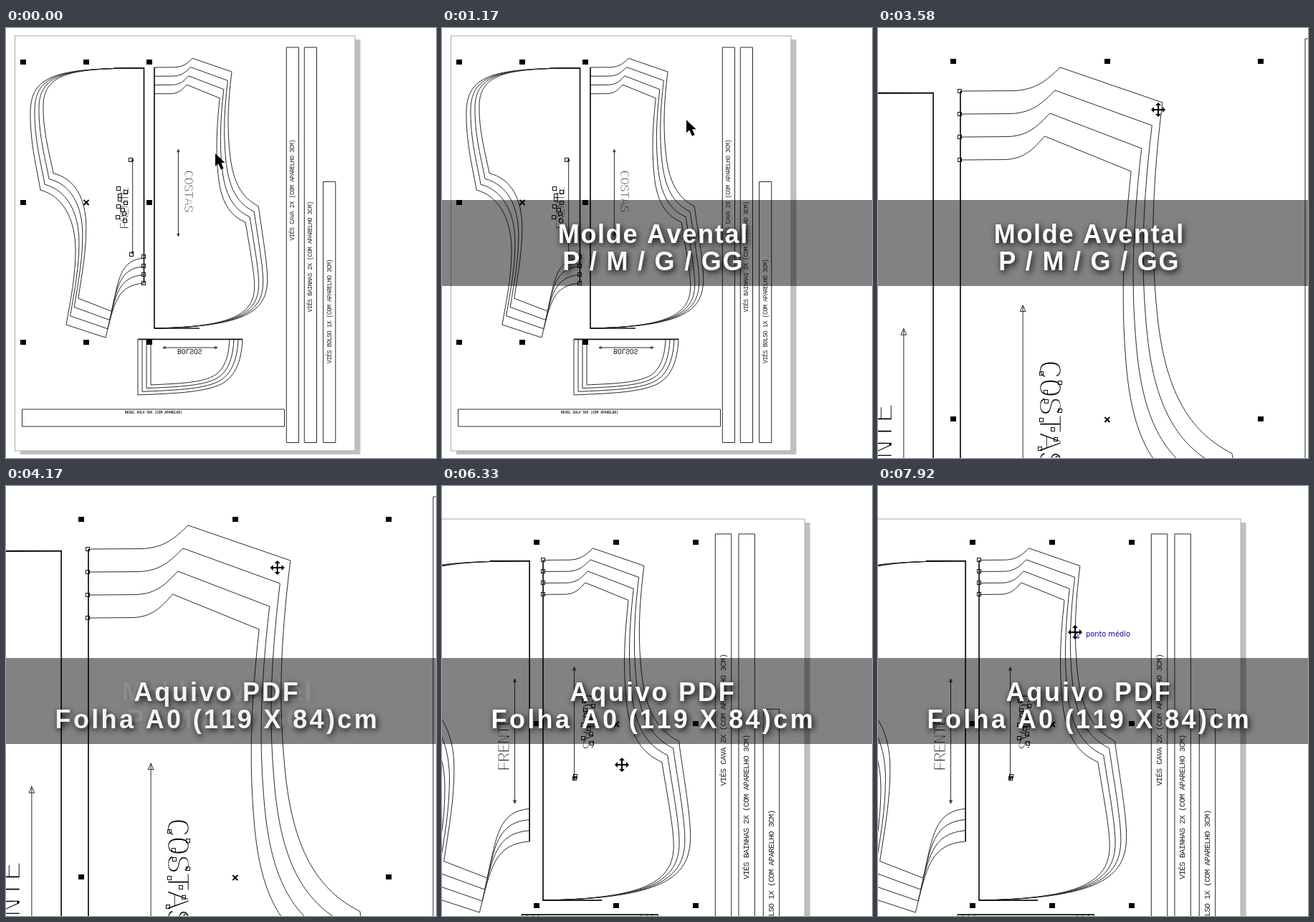
Animation of 600 by 600 pixels, one loop 8000 ms. Source, as an HTML page:

```html
<!DOCTYPE html>
<html lang="pt">
<head>
<meta charset="utf-8">
<title>Molde Avental</title>
<style>
  html, body { margin: 0; width: 100%; height: 100%; overflow: hidden; background: #fff; }
  svg { display: block; width: 100vw; height: 100vh; }
  #world path, #world rect { fill: none; stroke: #2a2a2a; stroke-width: 1; vector-effect: non-scaling-stroke; }
  #world .bold { stroke: #111; stroke-width: 1.7; }
  #world text { font-family: "Liberation Mono", monospace; fill: #222; }
  #world .big { font-size: 18px; letter-spacing: -1.1px; fill: #000; stroke: #fff; stroke-width: 1px; }
  .small { font-size: 8.4px; letter-spacing: -.49px; }
  .pocket { font-size: 10px; letter-spacing: -.3px; }
  .tiny { font-size: 4.6px; font-weight: bold; }
  .title { font: bold 36px "Liberation Sans", Arial, sans-serif; font-kerning: none; fill: #fff;
    text-anchor: middle; filter: drop-shadow(2px 3px 4px #000); }
  .hint { font: 9.8px "DejaVu Sans", Verdana, sans-serif; fill: #00009c; }
  .mark { fill: none; stroke: #1a1ab0; }
</style>
</head>
<body>
<svg viewBox="0 0 600 600" preserveAspectRatio="none">
  <rect width="600" height="600" fill="#fff"/>
  <rect id="shade" fill="#bfbfbf"/>
  <rect id="page" fill="#fff" stroke="#a8a8a8"/>
  <g id="world"></g>
  <g id="nodes" fill="none" stroke="#111"></g>
  <path id="grips"/>
  <path id="cross" fill="none" stroke="#000" stroke-width="2"/>
  <g id="nodeHint">
    <path class="mark" d="M235.5 37.5h10v9h-10zM256.5 37.5h8v9h-8z"/>
    <text class="hint" x="274" y="45">nó</text>
  </g>
  <g id="midHint">
    <path class="mark" d="M273 212l4-7 4 7z"/>
    <text class="hint" x="290" y="210">ponto médio</text>
  </g>
  <path id="cursor"/>
  <g id="banner">
    <rect y="240" width="600" height="120" fill="#000" fill-opacity=".49"/>
    <g id="title1" class="title">
      <text x="294.8" y="300" letter-spacing="1.7">Molde Avental</text>
      <text x="294.8" y="338" letter-spacing="1.8">P / M / G / GG</text>
    </g>
    <g id="title2" class="title">
      <text x="294.5" y="300" letter-spacing="2.8">Aquivo PDF</text>
      <text x="294.8" y="338" letter-spacing="3.35">Folha A0 (119 X 84)cm</text>
    </g>
  </g>
</svg>
<script>
const $ = id => document.getElementById(id);
const LOOP = 8000, STEP = LOOP / 96, SIZES = [0, 1, 2, 3];
const ramp = (t, a, b) => Math.min(1, Math.max(0, (t - a) / (b - a)));

// Grading: the armhole end shrinks towards the hem, the sides towards the fold.
const inset = d => Math.min(18, 0.155 * Math.abs(d));
const drop = (y, from, to) => 36.8 * (1 - ramp(y, from, to) ** 1.465);
const pieces = [
  {
    d: 'M192.5 356C154 359 151 385 139 432L84 414C91 375 97 345 97 310C97 265 78 234 48 226C44 200 33 160 34 115C36 64 75 56 192.5 56',
    grade: (x, y, k) => [x + k * inset(192.5 - x), y - k * drop(y, 400, 56)]
  },
  {
    d: 'M207 55L235.7 54.8C248 54.2 253.4 48.9 260.3 42.3L315 61.1C309 110 309 140 312 172C316 215 329 237 352.2 248.7C358 290 365 330 364.7 352C364 395 335 417 207 419',
    grade: (x, y, k) => [x - k * inset(x - 207), y + k * drop(y, 61, 419)]
  },
  {
    d: 'M184 434L184 512C230 510 275 509 300 497C322 486 329 460 330 434',
    grade: (x, y, k) => [257 + (x - 257) * (1 - 0.247 * k), 434 + (y - 434) * (1 - 0.18 * k)]
  }
];
const graded = ({ d, grade }) => SIZES.map(i =>
  path(d.replace(/([\d.]+) ([\d.]+)/g, (_, x, y) => grade(+x, +y, i / 3).join(' '))));

const path = (d, cls = '') => `<path class="${cls}" d="${d}"/>`;
const box = (x, y, w, h) => `<rect x="${x}" y="${y}" width="${w}" height="${h}"/>`;
const label = (s, x, y, turn, cls) =>
  `<text class="${cls}" transform="translate(${x} ${y}) ${turn}">${s}</text>`;
const arrowV = (x, a, b) =>
  path(`M${x} ${a}V${b}M${x - 1.5} ${a + 3.3}h3l-1.5-3.3zM${x - 1.5} ${b - 3.3}h3l-1.5 3.3z`);
const strip = (x, top, s, y) =>
  box(x, top, 17.2, 578.5 - top) + label(`VIÉS ${s} (COM APARELHO 3CM)`, x + 11, y, 'rotate(-90)', 'small');

$('world').innerHTML = [
  label('FRENTE', 170.7, 281, 'rotate(-90)', 'big'),
  label('COSTAS', 249, 198.5, 'rotate(90)', 'big'),
  label('BOLSOS', 239, 447.5, 'scale(1 -1)', 'pocket'),
  label('REVEL GOLA 50X (COM APARELHO)', 166, 538, '', 'tiny'),
  ...pieces.flatMap(graded),
  path('M192.5 356V56H150M184 434.3H330M207 55V419H270', 'bold'),
  arrowV(176.7, 182, 315.4),
  arrowV(240.4, 169.5, 290.5),
  path('M219 446H295M222.3 444.5v3l-3.3-1.5zM291.7 444.5v3l3.3-1.5z'),
  box(22.5, 532, 366, 24),
  strip(391.3, 27, 'CAVA 2X', 296.5),
  strip(416.3, 27, 'BAINHAS 2X', 396.5),
  strip(442.6, 214.5, 'BOLSO 1X', 468)
].join('');

// Node squares: one per neckline, then a scatter over the lettering.
const neckNodes = (x, y, dy) => SIZES.map(i => [x, y + i * dy]);
const textNodes = (x, y) => Array.from({ length: 10 }, (_, i) =>
  [x + 11 * (0.5 + 0.5 * Math.sin(i * 2.3 - 1)), y + i * 5]);

const picks = {
  front: {
    box: [32.5, 56, 191.5, 431],
    nodes: [...neckNodes(191.5, 356, -12.2), [174, 183.5], [175, 315.5], ...textNodes(156, 224)]
  },
  back: {
    box: [206.5, 42.3, 364.5, 419],
    nodes: [...neckNodes(206.7, 55, 12.2), [240.4, 288.5], [241.5, 286.5], ...textNodes(249.5, 206)]
  }
};

// Zoom and offset
const views = {
  full: [1, 0, 0],
  near: [2.61, -425.3, -55.5],
  mid: [1.304, -128.9, 31.7]
};

// Pointer stops: time, x, y
const stops = [
  [0, 292, 175], [330, 345, 133], [1000, 345, 133], [2250, 263, 34], [3100, 266, 54],
  [3580, 391, 114], [4000, 391, 114], [5170, 167, 116], [5750, 167, 116], [6330, 251, 389],
  [6670, 251, 384], [7120, 270, 153], [7480, 203, 327], [7900, 275, 204], [LOOP, 275, 204]
];
const ARROW = 'M0 0V18L4.2 14.3 8 22.5 11.6 20.8 8 13H13.5Z';
const MOVE = 'M0-10L4-6H1V-1H6V-4L10 0L6 4V1H1V6H4L0 10L-4 6H-1V1H-6V4L-10 0L-6-4V-1H-1V-6H-4Z';

const show = (id, on) => $(id).setAttribute('visibility', on ? 'visible' : 'hidden');
function set(id, attrs) {
  for (const k in attrs) $(id).setAttribute(k, attrs[k]);
}

function pointer(t) {
  const i = Math.max(1, stops.findIndex(s => s[0] >= t));
  const [a, b] = [stops[i - 1], stops[i]];
  let k = ramp(t, a[0], b[0]);
  k = k * k * (3 - 2 * k);
  return [a[1] + (b[1] - a[1]) * k, a[2] + (b[2] - a[2]) * k];
}

function drawPage([s, dx, dy]) {
  const [x, y] = [12.5 * s + dx, 11 * s + dy];
  const size = { width: 474.5 * s, height: 579 * s };
  set('page', { x, y, ...size });
  set('shade', { x: x + 7.5, y: y + 5, ...size });
  $('world').setAttribute('transform', `matrix(${s} 0 0 ${s} ${dx} ${dy})`);
}

function drawPick({ box: [l, t, r, b], nodes }, [s, dx, dy], grips) {
  const X = x => x * s + dx, Y = y => y * s + dy;
  $('nodes').innerHTML = nodes.map(([x, y]) =>
    box(Math.round(X(x)) - 2.5, Math.round(Y(y)) - 2.5, 5, 5)).join('');
  const xs = [X(l) - 8.5, X((l + r) / 2), X(r) + 8];
  const ys = [Y(t) - 8, Y((t + b) / 2), Y(b) + 8];
  let d = '';
  xs.forEach((x, i) => ys.forEach((y, j) => {
    if (i !== 1 || j !== 1) d += `M${Math.round(x) - 4} ${Math.round(y) - 4}h8v7h-8z`;
  }));
  set('grips', { d });
  set('cross', { d: `M${xs[1] - 3.5} ${ys[1] - 3.5}l7 7m0-7l-7 7` });
  show('grips', grips);
  show('cross', grips);
}

function render(t) {
  const view = t < 2325 ? views.full : t < 5245 ? views.near : views.mid;
  drawPage(view);
  drawPick(t < 1245 ? picks.front : picks.back, view, t < 2160 || t >= 2325);
  const [x, y] = pointer(t);
  set('cursor', { d: t < 2325 ? ARROW : MOVE, transform: `translate(${x} ${y})` });
  show('nodeHint', t > 2075 && t < 2325);
  show('midHint', t > 7820);
  const swap = ramp(t, 3790, 4200);
  set('banner', { opacity: ramp(t, 0, 417) });
  set('title1', { opacity: 1 - swap });
  set('title2', { opacity: swap });
}

function tick() {
  const t = performance.now() % LOOP;
  render(Math.floor((t + 5) / STEP) % 96 * STEP);
  requestAnimationFrame(tick);
}
tick();
</script>
</body>
</html>
```
